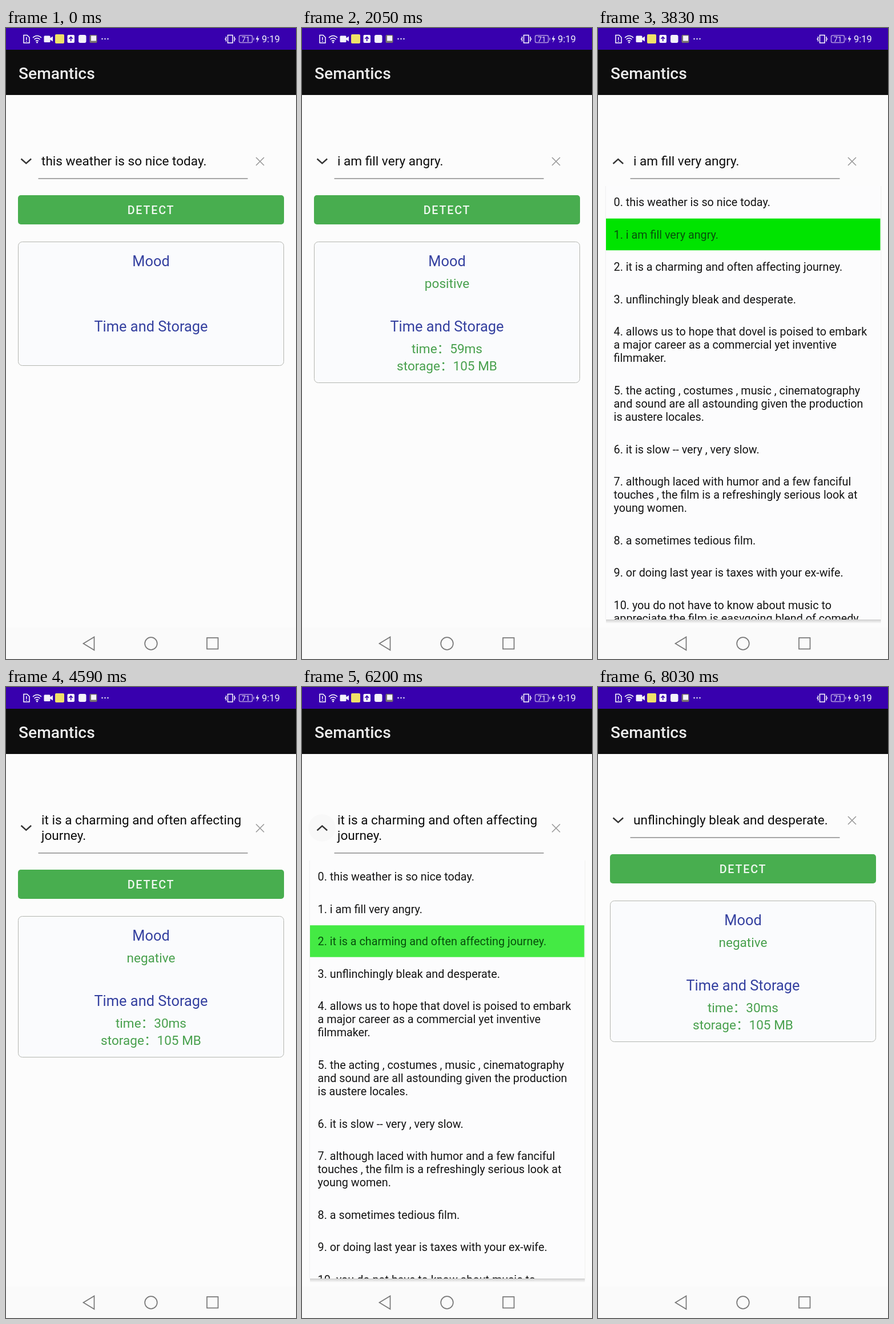
These frames come from a looping animation (508x1102 px, 8.16 s). An HTML page:

```html
<!DOCTYPE html>
<html lang="en">
<head>
<meta charset="utf-8">
<title>Semantics</title>
<style>
  html, body { margin: 0; width: 100%; height: 100%; overflow: hidden; background: #fcfcfc; }
  svg { display: block; width: 100vw; height: 100vh; }
  text { font-family: Roboto, "Noto Sans CJK SC", sans-serif; white-space: pre; }
  .mid { text-anchor: middle; }
  .input { font-size: 22.58px; fill: #0c0c0c; }
  .item { font-size: 19.76px; fill: #141414; }
  .head { font-size: 25.4px; fill: #3541a0; }
  .value { font-size: 22.58px; fill: #48a04d; }
  .line { fill: none; stroke: #777; stroke-width: 1.7; }
  .icon { fill: none; stroke: #fff; stroke-width: 1.5; }
  .white { fill: #f4f2fa; }
</style>
</head>
<body>
<svg viewBox="0 0 508 1102" preserveAspectRatio="none">
  <defs>
    <clipPath id="listClip"><rect x="0" y="270" width="508" height="763"/></clipPath>
    <linearGradient id="shade" x2="0" y2="1">
      <stop offset="0" stop-color="#cfcfcf"/><stop offset="1" stop-color="#fcfcfc"/>
    </linearGradient>
  </defs>
  <rect width="508" height="1102" fill="#fcfcfc"/>

  <rect width="508" height="38" fill="#3800ae"/>
  <g>
    <path class="icon" d="M31 12.5h6l4 4v9.5h-10zM35.8 16v5M35.8 22.5v1.5"/>
    <path class="icon" d="M47 17q7.5-7 15 0M49.5 20q5-4.5 10 0M52 22.8q2.5-2 5 0"/>
    <circle class="white" cx="54.5" cy="25" r="1.5"/>
    <path class="white" d="M68 13.5h8q1.5 0 1.5 1.5v2.5l4.5-3v9l-4.5-3v3q0 1.5-1.5 1.5h-8q-1.5 0-1.5-1.5v-8.5q0-1.5 1.5-1.5z"/>
    <rect x="86" y="11" width="16" height="16" rx="2" fill="#f0e268"/>
    <rect class="white" x="107.5" y="12" width="12.5" height="14" rx="2"/>
    <path d="M113.7 23v-7M110.500 19l3.2-3.5 3.2 3.5" fill="none" stroke="#3800ae" stroke-width="1.7"/>
    <rect class="white" x="127" y="12" width="13.5" height="14" rx="3"/>
    <rect x="146.5" y="12" width="13" height="14" rx="2" fill="#77716f"/>
    <rect class="white" x="149" y="13.5" width="9" height="9"/>
    <g class="white"><circle cx="168.5" cy="19" r="1.2"/><circle cx="173.5" cy="19" r="1.2"/><circle cx="178.5" cy="19" r="1.2"/></g>
    <path class="icon" d="M388.5 12.5h8.500v13.5h-8.500zM385.5 15v3l-1.5 1.2 1.5 1.2v3M400 15v3l1.5 1.2-1.5 1.2v3"/>
    <g opacity="0.6">
      <rect class="icon" x="408.500" y="13" width="23" height="12.5" rx="2.5"/>
      <path class="icon" d="M434 17v4.5"/>
    </g>
    <text class="mid white" x="420" y="24" font-size="13">71</text>
    <path class="white" d="M441.5 12.5l-4 7.5h3l-1.5 6 4.5-8h-3z"/>
    <text class="white" x="448" y="25" font-size="16.5">9:19</text>
  </g>

  <rect y="38" width="508" height="79" fill="#0d0d0d"/>
  <text x="22" y="89" font-size="28.22" font-weight="500" fill="#ececec">Semantics</text>

  <text class="input" x="62" y="240" id="input1"></text>
  <text class="input" x="62" y="267" id="input2"></text>
  <g id="icons">
    <circle id="halo" cx="35" cy="232.5" r="24" fill="#000"/>
    <path id="chevron" fill="none" stroke="#333" stroke-width="2.4"/>
    <path d="M438 226l14 14M452 226l-14 14" fill="none" stroke="#999" stroke-width="1.6"/>
  </g>

  <g id="body">
    <path d="M56.5 263h367" stroke="#555" stroke-width="1.2"/>
    <rect id="button" x="21" y="292" width="466" height="51" rx="5"/>
    <text class="mid" x="254" y="325" font-size="19.76" font-weight="500" letter-spacing="1.76" fill="#f0f8f0">DETECT</text>
    <rect id="card" x="21.5" y="373.5" width="465" rx="7" fill="#fafbfd" stroke="#b4b6b0"/>
    <text class="head mid" x="254" y="415.5">Mood</text>
    <text class="value mid" x="254" y="454" id="mood"></text>
    <text class="head mid" x="254" y="530">Time and Storage</text>
    <text class="value mid" x="254" y="568" id="time" lang="zh-CN"></text>
    <text class="value mid" x="254" y="598" id="storage" lang="zh-CN"></text>
  </g>

  <g id="list">
    <rect x="14" y="1033" width="481.5" height="7" fill="url(#shade)"/>
    <g clip-path="url(#listClip)">
      <g id="rows">
        <rect x="12.5" y="276" width="484" height="800" fill="#f3f3f3"/>
        <rect x="14" y="276" width="481" height="800" fill="#fcfcfd"/>
        <rect id="mark" x="14" width="480.5" height="55.5" fill="#00e400"/>
      </g>
    </g>
  </g>
  <circle id="touch" r="16" fill="#aaa"/>

  <rect y="1047" width="508" height="55" fill="#fafafa"/>
  <path class="line" d="M135.5 1075l19-11.5v23z"/>
  <circle class="line" cx="254" cy="1075" r="10.8"/>
  <rect class="line" x="352" y="1065" width="19.5" height="19.5"/>
</svg>
<script>
(() => {
  const LOOP = 8160, LIST_TOP = 276.3, ROW = 56.44, LINE = 23.16, WRAP = 27;

  const items = [
    ['this weather is so nice today.'],
    ['i am fill very angry.'],
    ['it is a charming and often affecting journey.'],
    ['unflinchingly bleak and desperate.'],
    ['allows us to hope that dovel is poised to embark', 'a major career as a commercial yet inventive', 'filmmaker.'],
    ['the acting , costumes , music , cinematography', 'and sound are all astounding given the production', 'is austere locales.'],
    ['it is slow -- very , very slow.'],
    ['although laced with humor and a few fanciful', 'touches , the film is a refreshingly serious look at', 'young women.'],
    ['a sometimes tedious film.'],
    ['or doing last year is taxes with your ex-wife.'],
    ['you do not have to know about music to', 'appreciate the film is easygoing blend of comedy']
  ];

  // One round per sentence: press the button, get a result, open the list, pick the next.
  const rounds = [
    { text: items[0], press: 130, done: 490, mood: 'positive', ms: 59, tap: 930, open: 1010, pick: 1510, close: 1690 },
    { text: items[1], press: 2050, done: 2470, mood: 'negative', ms: 30, tap: 3120, open: 3440, pick: 4190, close: 4360 },
    { text: ['it is a charming and often affecting', 'journey.'],
      press: 5040, done: 5310, mood: 'positive', ms: 30, tap: 5800, open: 6070, pick: 6640, close: 6900 },
    { text: items[3], press: 7400, done: 7850, mood: 'negative', ms: 30,
      tap: Infinity, open: Infinity, pick: Infinity, close: Infinity }
  ];

  const $ = id => document.getElementById(id);
  const set = (id, attrs) => { for (const k in attrs) $(id).setAttribute(k, attrs[k]); };
  const ramp = (t, from, length) => Math.min(1, Math.max(0, (t - from) / length));
  const pulse = (t, from, to, fade) => ramp(t, from, 80) * (1 - ramp(t, to, fade));
  const mix = (a, b, k) => `rgb(${a.map((v, i) => Math.round(v + (b[i] - v) * k))})`;
  const shift = y => ({ transform: `translate(0 ${y})` });
  const offset = round => (round.text.length - 1) * WRAP;

  const rowTops = [], labels = [];

  function buildList() {
    let y = LIST_TOP;
    items.forEach((lines, i) => {
      rowTops.push(y);
      lines.forEach((line, n) => {
        const el = document.createElementNS('http://www.w3.org/2000/svg', 'text');
        el.setAttribute('class', 'item');
        el.setAttribute('x', 27.6);
        el.setAttribute('y', y + 35 + n * LINE);
        el.textContent = n ? line : `${i}. ${line}`;
        $('rows').append(el);
        labels.push(el);
      });
      y += ROW + (lines.length - 1) * LINE;
    });
  }

  function drawInput(t, round) {
    const y = offset(round);
    $('input1').textContent = round.text[0];
    $('input2').textContent = round.text[1] || '';
    set('icons', shift(y / 2));
    set('body', shift(y));
    set('chevron', { d: t >= round.open ? 'M26.5 237l8.8-8 8.8 8' : 'M26.5 228.5l8.8 8 8.8-8' });
    set('halo', { opacity: 0.08 * pulse(t, round.tap, round.open, 160) });
  }

  function drawResult(t, index) {
    const round = rounds[index];
    const shown = t >= round.done ? round : rounds[index - 1];
    const press = pulse(t, round.press, round.done + 50, 120);
    set('button', { fill: mix([72, 174, 79], [56, 127, 59], press) });
    set('card', { height: shown ? 246 : 216 });
    $('mood').textContent = shown ? shown.mood : '';
    $('time').textContent = shown ? `time\uff1a${shown.ms}ms` : '';
    $('storage').textContent = shown ? 'storage\uff1a105 MB' : '';
  }

  function drawList(t, index) {
    const last = index > 0 && t < rounds[index - 1].close + 150 ? index - 1 : index;
    const round = rounds[last];
    const alpha = ramp(t, round.open, 130) * (1 - ramp(t, round.close, 150));
    set('list', { opacity: alpha, visibility: alpha ? 'visible' : 'hidden' });
    set('rows', shift(offset(round)));
    set('mark', { y: rowTops[last], opacity: ramp(t, round.open, 180) });
    labels.forEach((el, i) => { el.style.fill = i === last ? '#07500c' : ''; });
  }

  function drawTouch(t, index) {
    const round = rounds[index], y = offset(round);
    let cx = 395, cy = 318 + y, from = round.press, to = round.done + 50;
    if (t >= round.pick - 80) {
      cx = 358; cy = rowTops[index + 1] + y + 10; from = round.pick - 80; to = round.close - 60;
    } else if (t >= round.tap) {
      cx = 35; cy = 233 + y / 2; from = round.tap; to = round.open;
    }
    set('touch', { cx, cy, opacity: 0.3 * pulse(t, from, to, 60) });
  }

  function draw(t) {
    const index = rounds.findIndex(r => t < r.close);
    drawInput(t, rounds[index]);
    drawResult(t, index);
    drawList(t, index);
    drawTouch(t, index);
  }

  buildList();
  const start = performance.now();
  function tick() {
    draw((performance.now() - start) % LOOP);
    requestAnimationFrame(tick);
  }
  tick();
})();
</script>
</body>
</html>
```
